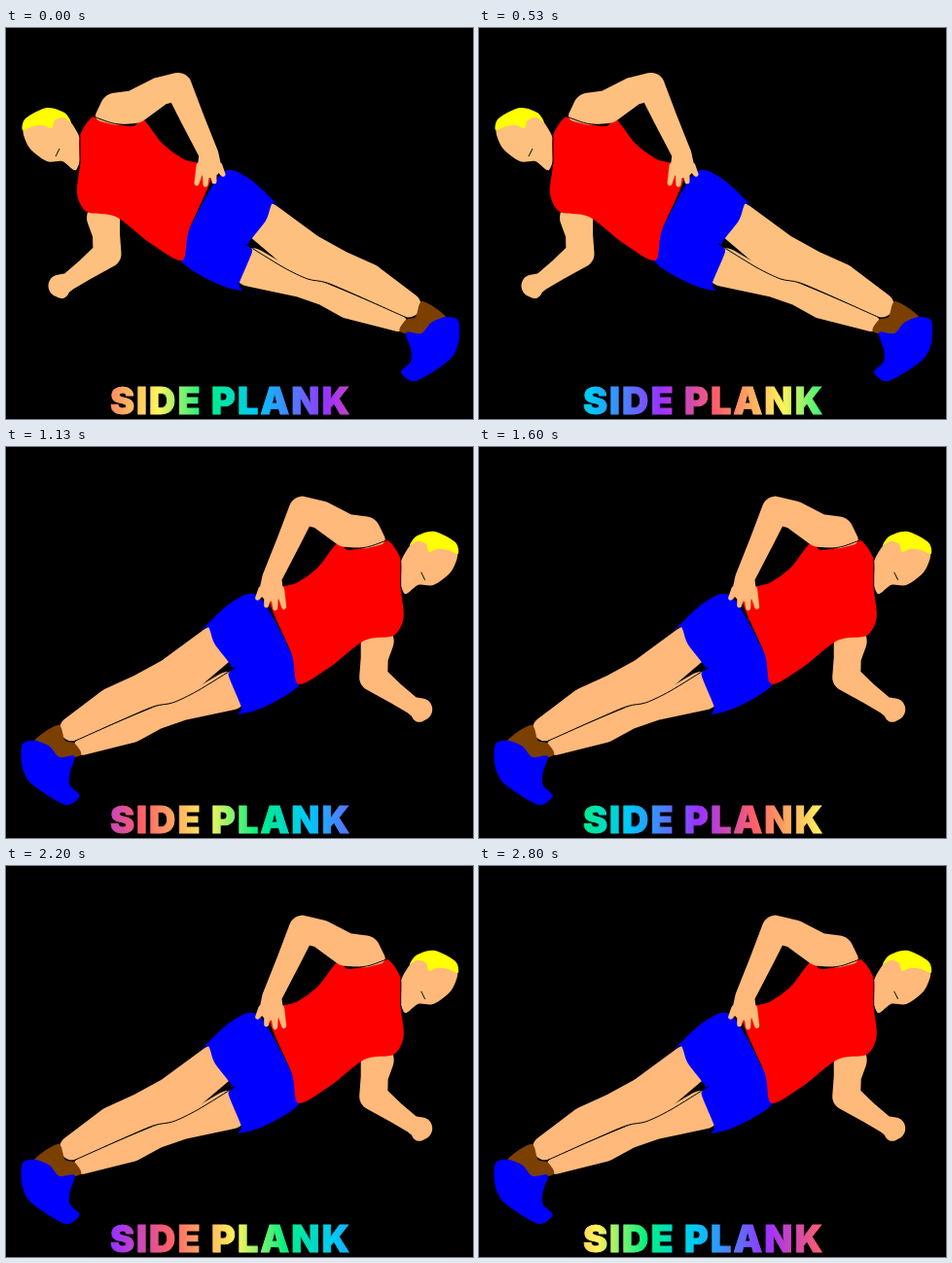
An HTML page with a canvas for the animation above (2870 ms loop, 480 by 402 pixels).

```html
<!DOCTYPE html>
<html lang="en">
<head>
<meta charset="utf-8">
<title>Side plank</title>
<style>
  html, body { margin: 0; width: 100%; height: 100%; overflow: hidden; background: #000; }
  canvas { display: block; }
</style>
</head>
<body>
<canvas id="stage" width="480" height="402"></canvas>
<script>
const ctx = document.getElementById('stage').getContext('2d');

const LOOP = 2870, FRAMES = 43, FPS = 15, TURN = 15;

const parse = text => text.split(' ').map(p => p.split(',').map(Number));

// Smooth curve through a few key points.
function curve(text, closed = true) {
  const pts = parse(text), n = pts.length, k = 0.14;
  const at = i => closed ? pts[(i + n) % n] : pts[Math.max(0, Math.min(n - 1, i))];
  const path = new Path2D();
  path.moveTo(...pts[0]);
  for (let i = 0; i < (closed ? n : n - 1); i++) {
    const [a, b, c, d] = [at(i - 1), at(i), at(i + 1), at(i + 2)];
    path.bezierCurveTo(
      b[0] + (c[0] - a[0]) * k, b[1] + (c[1] - a[1]) * k,
      c[0] - (d[0] - b[0]) * k, c[1] - (d[1] - b[1]) * k,
      c[0], c[1]);
  }
  return path;
}

// Tapered tube around joints given as x,y,radius.
function limb(joints) {
  const path = new Path2D();
  for (let i = 1; i < joints.length; i++) {
    const [x1, y1, r1] = joints[i - 1], [x2, y2, r2] = joints[i];
    const dir = Math.atan2(y2 - y1, x2 - x1);
    const off = Math.acos((r1 - r2) / Math.hypot(x2 - x1, y2 - y1));
    const part = new Path2D();
    part.arc(x1, y1, r1, dir + off, dir - off + 2 * Math.PI);
    part.arc(x2, y2, r2, dir - off, dir + off);
    part.closePath();
    path.addPath(part);
  }
  return path;
}

const lowLeg = limb(parse('252,246,20 301,265,11.5 327,274,11.5 352,286,13 403,303,9'));
const topLeg = limb(parse('266,200,21 309,234,23 340,246,18.5 372,260,18 414,285,12.5'));
const forearm = limb(parse('100,195,17 103,212,14 104,232,14.5 83,247.5,11 64,261,9 55,265,11.5 57,270,8'));
const arm = limb(parse('98,90,6 113,83,16.5 132,81,17 158,65,14.5 177,60,14 192,94,12 208.5,130,10 209,142,12'));
for (let i = 0; i < 4; i++)
  arm.addPath(limb([[200 + 6 * i, 142, 4.5], [196 + 9 * i, 161 - 2.2 * (i - 0.8) ** 2, 2.5]]));

const sock = curve('428,281 453,299 430,316 405,312 411,300 421,297');
const shoe = curve('452,297 465,301 465,324 455,342 421,363 406,354 416,343 416,330 411,313 427,314 437,303');
const shorts = curve('222,149 250,155 284,187 274,180 267,198 249,222 253,230 240,262 242,270 215,262 180,239 188,208');
const shirt = curve('90,91 110,98 131,101 141,94 161,119 183,135 212,148 188,208 181,239 148,221 113,194 ' +
  '83,189 73,170 76,140 76,111');
const face = curve('18,102 24,123 42,137 58,137 72,146 78,120 64,94 40,86');
const hair = curve('17,105 20,93 42,82 60,87 67,97 59,92 50,95 47,103 38,100 28,101');

const creases = [
  '246,222 285,246 310,258 330,262 365,277 412,298',
  '90,91 110,98 131,100',
  '76,111 76,140',
  '55,124 51,132'
].map(c => curve(c, false));

function drawBody(skin) {
  const parts = [
    [lowLeg, skin], [topLeg, skin], [sock, '#7b3f00'], [shoe, '#00f'], [shorts, '#00f'],
    [forearm, skin], [face, skin], [hair, '#ff0'], [shirt, '#f00'], [arm, skin]
  ];
  for (const [path, color] of parts) {
    ctx.fillStyle = color;
    ctx.fill(path);
  }
  ctx.strokeStyle = '#000';
  ctx.lineWidth = 1;
  for (const c of creases) ctx.stroke(c);
}

const PERIOD = 300;
const rainbow = [
  [0, '#ff5f68'], [0.23, '#fff45c'], [0.4, '#00f082'],
  [0.57, '#00c8fa'], [0.81, '#9b32ff'], [1, '#ff5f68']
];

function drawTitle(shift) {
  const start = shift % PERIOD - PERIOD;
  const grad = ctx.createLinearGradient(start, 0, start + PERIOD * 3, 0);
  for (let lap = 0; lap < 3; lap++)
    for (const [pos, color] of rainbow) grad.addColorStop((lap + pos) / 3, color);
  ctx.fillStyle = ctx.strokeStyle = grad;
  ctx.lineWidth = 0.8;
  ctx.font = '900 37.8px Inter, "Open Sans", sans-serif';
  ctx.letterSpacing = '2px';
  ctx.textAlign = 'center';
  ctx.fillText('SIDE PLANK', 231, 397.3);
  ctx.strokeText('SIDE PLANK', 231, 397.3);
}

function draw(now) {
  // The small lead absorbs frame times rounded down to 10 ms.
  const frame = Math.floor(now % LOOP / LOOP * FRAMES + 0.1) % FRAMES;
  const t = frame / FPS;
  const turned = frame >= TURN;

  ctx.fillStyle = '#000';
  ctx.fillRect(0, 0, 480, 402);

  ctx.save();
  if (turned) ctx.transform(-1, 0, 0, 1, 481.7, 4.8);
  drawBody(turned ? '#ffb97a' : '#fec07e');
  ctx.restore();

  drawTitle(turned ? 398 + 308 * (t - 1) : 87 + 294 * t);
}

const begin = performance.now();
function tick() {
  draw(performance.now() - begin);
  requestAnimationFrame(tick);
}
tick();
</script>
</body>
</html>
```
